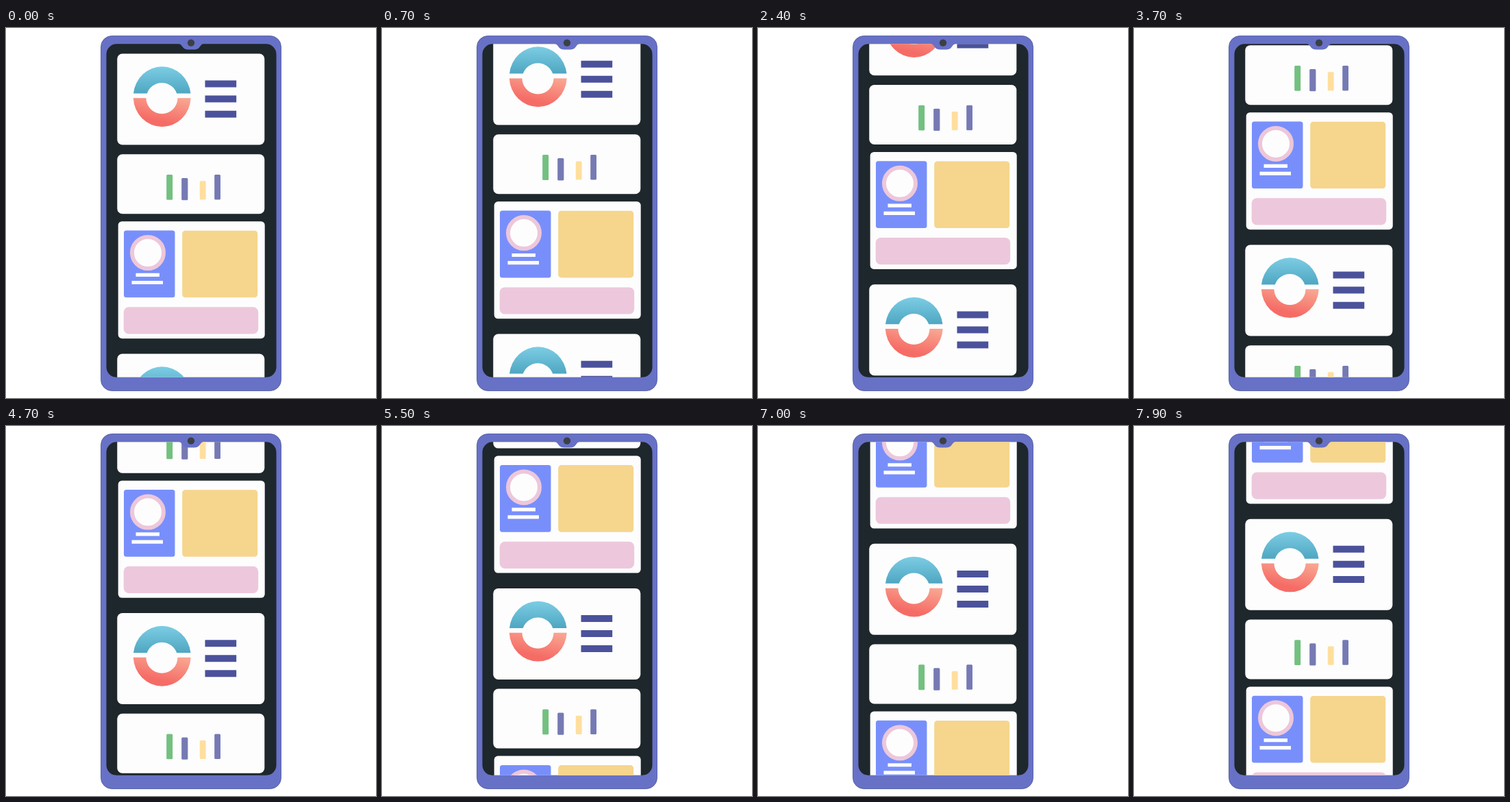
Write an HTML page that moves like this. It is 540x540 px and loops after 8000 ms.

```html
<!DOCTYPE html>
<html lang="en">
<head>
<meta charset="utf-8">
<title>Scrolling phone dashboard</title>
<style>
  html, body { margin: 0; width: 100%; height: 100%; overflow: hidden; background: #fff; }
  svg { display: block; width: 100vw; height: 100vh; }
</style>
</head>
<body>
<svg viewBox="0 0 540 540">
  <defs>
    <linearGradient id="blue" x1="0" y1="0" x2="0" y2="1">
      <stop offset="0" stop-color="#7ccde4"/>
      <stop offset="1" stop-color="#4fa6c1"/>
    </linearGradient>
    <linearGradient id="red" x1="0.8" y1="0" x2="0.45" y2="0.8">
      <stop offset="0" stop-color="#f9a591"/>
      <stop offset="1" stop-color="#f56c66"/>
    </linearGradient>
    <clipPath id="screen"><rect x="146.5" y="23.3" width="248" height="486.5" rx="15"/></clipPath>

    <g id="page">
      <g fill="#fdfdfe">
        <rect x="162.3" y="37.5" width="215" height="133" rx="7.5"/>
        <rect x="162.3" y="184.2" width="215" height="87" rx="7.5"/>
        <rect x="163.7" y="282.2" width="214" height="171" rx="5.5"/>
      </g>

      <path fill="url(#blue)" d="M186 95.5A42 44 0 0 1 269.5 95.5H249.2A23 23 0 0 0 205.8 95.5Z"/>
      <path fill="url(#red)" d="M185.8 102.3A42 44 0 0 0 269.7 102.3H250.5A23 23 0 0 1 204.5 102.3Z"/>
      <path stroke="#4b529b" stroke-width="10" d="M290.5 81.6H336.2M290.5 103.6H336.2M290.5 125.7H336.2"/>

      <rect x="234.2" y="214" width="9" height="36.8" rx="1.5" fill="#74c080"/>
      <rect x="256.2" y="219" width="9.2" height="32.3" rx="1.5" fill="#757ab3"/>
      <rect x="282.8" y="223.3" width="8.9" height="27.2" rx="1.5" fill="#ffdf9e"/>
      <rect x="304.2" y="214" width="8.8" height="36.5" rx="1.5" fill="#757ab3"/>

      <rect x="172" y="295.5" width="74.5" height="97.8" rx="3.5" fill="#788ffb"/>
      <circle cx="207" cy="328" r="23" fill="#fdfdfe" stroke="#edc7da" stroke-width="6"/>
      <path stroke="#fdfdfe" stroke-width="5.2" d="M189.5 360.4H224M183.5 371.5H229"/>
      <rect x="257.2" y="295.7" width="110" height="97.6" rx="4.5" fill="#f6d58d"/>
      <rect x="171.7" y="407.3" width="196.5" height="39.2" rx="7.5" fill="#edc8dc"/>
    </g>
  </defs>

  <rect x="138.5" y="11.5" width="263" height="518" rx="16" fill="#6771c6" stroke="#4d5597" stroke-width="0.8"/>
  <g clip-path="url(#screen)">
    <rect x="146" y="23" width="249" height="488" fill="#1e272b"/>
    <g id="feed"></g>
  </g>
  <path fill="#6771c6" d="M250 22.5C255 23.2 255.8 25 257.5 27.3C259.5 30.3 262 31.4 266 31.4H274.5C278.5 31.4 281 30.3 283 27.3C284.7 25 285.5 23.2 290 22.5Z"/>
  <circle cx="270" cy="21.6" r="5.2" fill="#3b4046"/>
</svg>
<script>
  const LOOP = 8000;
  const HOLD = 100;           // display interval in ms
  const STEPS_PER_HOLD = 0.6; // the feed itself advances six times a second
  const STEP = 7.23;
  const PAGE_HEIGHT = 438;

  const feed = document.getElementById('feed');
  feed.innerHTML = [0, 1]
    .map(i => `<use href="#page" y="${i * PAGE_HEIGHT}"/>`)
    .join('');

  function render(time) {
    const tick = Math.floor((time % LOOP) / HOLD);
    const scroll = Math.floor(tick * STEPS_PER_HOLD + 1e-6) * STEP;
    feed.setAttribute('transform', `translate(0 ${-scroll})`);
  }

  const start = performance.now();
  function frame() {
    render(performance.now() - start);
    requestAnimationFrame(frame);
  }
  frame();
</script>
</body>
</html>
```
